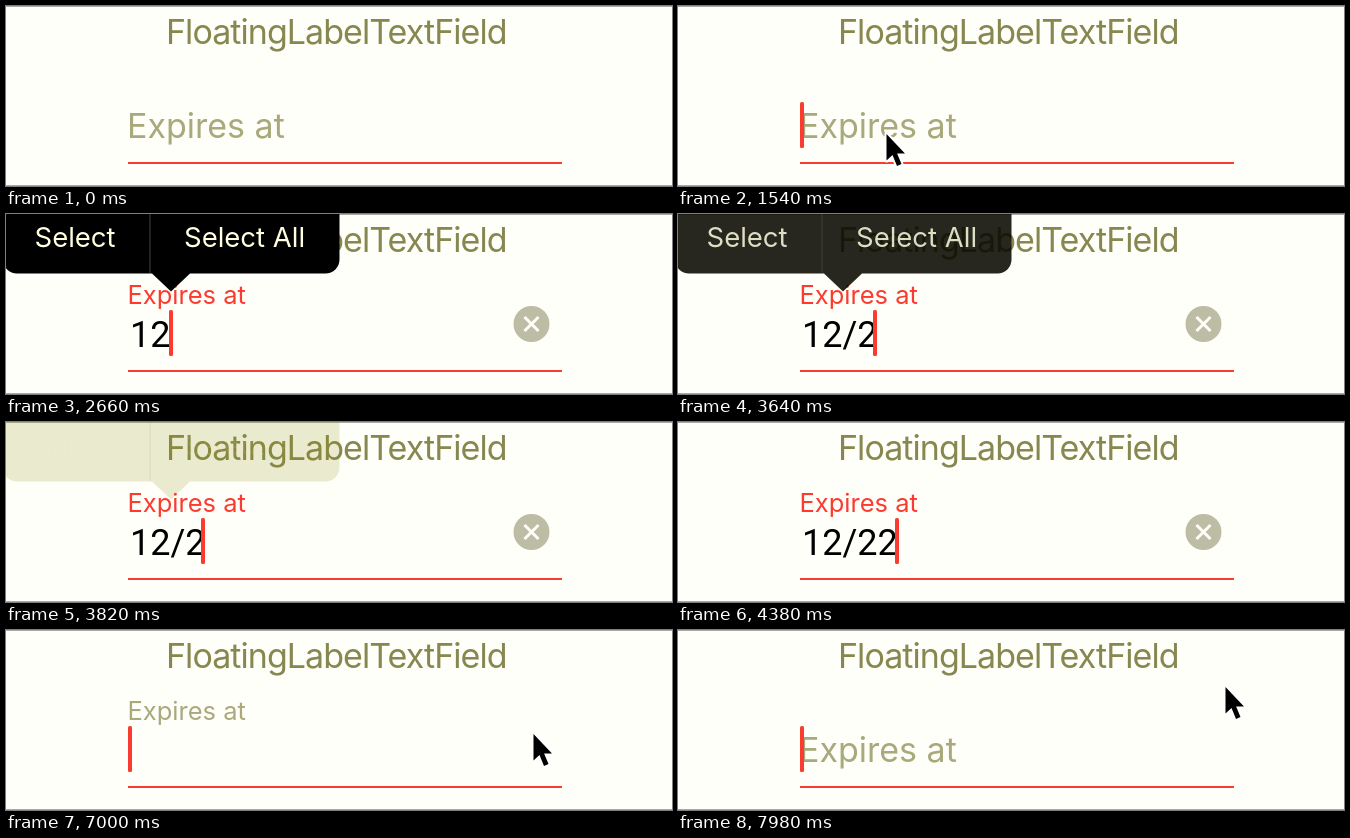
Recreate the animation shown at these times as an HTML page with a canvas. Size 666 px wide and 180 px high, loop 8000 ms.

```html
<!DOCTYPE html>
<html lang="en">
<head>
<meta charset="utf-8">
<title>Floating label text field</title>
<style>
  html, body { margin: 0; width: 100%; height: 100%; overflow: hidden; background: #fffffa; }
  canvas { display: block; }
</style>
</head>
<body>
<canvas id="stage" width="666" height="180"></canvas>
<script>
const ctx = document.getElementById('stage').getContext('2d');
const LOOP = 8000;
const TEXT_FONT = 'Inter, sans-serif';
const DIGIT_FONT = 'Roboto, sans-serif'; // digits of equal width
const PAPER = '#fffffa', RED = '#fb3b2f', GRAY = '#a9a97c', OLIVE = '#87874f';

const FOCUS = 1520, FLOAT_UP = 1880, CLEAR = 6960, FLOAT_DOWN = 7010;

// Field states: start time, text and caret position.
const STATES = [
  { at: 0, text: '' },
  { at: FOCUS, text: '', caret: 124 },
  { at: FLOAT_UP, text: '1', caret: 144 },
  { at: 2050, text: '12', caret: 165 },
  { at: 3500, text: '12/2', caret: 197 },
  { at: 4080, text: '12/22', caret: 219 },
  { at: CLEAR, text: '', caret: 124 }
];

// Each pointer visit is a list of [time, x, y].
const VISITS = [
  [[740, 600, 185], [1080, 400, 150], [1460, 208.5, 128], [2400, 208.5, 128]],
  [[4900, 208.5, 128], [5640, 568, 122], [5800, 575, 118], [6400, 527.5, 104],
   [7440, 527.5, 104], [7760, 550, 61], [7920, 547.5, 57], [8000, 547.5, 57]]
];

const clamp = v => Math.min(1, Math.max(0, v));
const progress = (t, from, to) => clamp((t - from) / (to - from));
const smooth = p => p * p * (3 - 2 * p);
const mix = (a, b, p) => a + (b - a) * p;

function write(text, x, y, size, color, { font = TEXT_FONT, spacing = 0 } = {}) {
  ctx.font = `${size}px ${font}`;
  ctx.letterSpacing = spacing + 'px';
  ctx.fillStyle = color;
  ctx.fillText(text, x, y);
}

function rect(x, y, w, h, color) {
  ctx.fillStyle = color;
  ctx.fillRect(x, y, w, h);
}

function drawLabel(t, hasText) {
  const up = smooth(progress(t, FLOAT_UP, 2180)) - smooth(progress(t, FLOAT_DOWN, 7310));
  write('Expires at', mix(121, 121.5, up), mix(132, 90, up), mix(34, 25.5, up), hasText ? RED : GRAY);
}

function drawClearButton() {
  ctx.fillStyle = '#bdbda6';
  ctx.beginPath();
  ctx.arc(525.5, 110, 18, 0, Math.PI * 2);
  ctx.fill();
  ctx.strokeStyle = PAPER;
  ctx.lineWidth = 3;
  ctx.beginPath();
  ctx.moveTo(518.5, 103); ctx.lineTo(532.5, 117);
  ctx.moveTo(532.5, 103); ctx.lineTo(518.5, 117);
  ctx.stroke();
}

function drawCaret(t, state) {
  const phase = (t - state.at) % 1000;
  ctx.globalAlpha = 1 - progress(phase, 680, 760) + progress(phase, 920, 1000);
  ctx.fillStyle = RED;
  ctx.beginPath();
  ctx.roundRect(state.caret - 2, 96, 4, 46, 1.5);
  ctx.fill();
  ctx.globalAlpha = 1;
}

function drawMenu(t) {
  const alpha = progress(t, 2110, 2320) - progress(t, 3605, 3840);
  if (alpha <= 0) return;
  const shape = new Path2D();
  shape.roundRect(-3, -20, 336.5, 79.5, 14);
  shape.addPath(new Path2D('M146 59.4H184L165 77.5Z'));

  // The half-faded menu has a yellow tint.
  ctx.fillStyle = `rgba(255,255,0,${1.4 * alpha * (1 - alpha)})`;
  ctx.fill(shape);
  ctx.globalAlpha = alpha;
  ctx.fillStyle = '#000';
  ctx.fill(shape);
  rect(143.5, 0, 1, 59, '#45453a');
  write('Select', 28.5, 32.5, 27.5, '#ffffe0');
  write('Select All', 178, 32.5, 27.5, '#ffffe0');
  ctx.globalAlpha = 1;
}

function drawPointer(t) {
  const path = VISITS.find(v => t >= v[0][0] && t < v[v.length - 1][0]);
  if (!path) return;
  const i = path.findIndex(point => point[0] > t);
  const [t0, x0, y0] = path[i - 1], [t1, x1, y1] = path[i];
  const p = smooth(progress(t, t0, t1));
  ctx.save();
  ctx.translate(mix(x0, x1, p), mix(y0, y1, p));
  const arrow = new Path2D('M0 0V26.5L6 21L10.5 32L15 30L10.6 19.5H18.5Z');
  ctx.strokeStyle = '#fff';
  ctx.lineWidth = 4;
  ctx.lineJoin = 'round';
  ctx.stroke(arrow);
  ctx.fillStyle = '#000';
  ctx.fill(arrow);
  ctx.restore();
}

function draw(t) {
  const state = STATES.findLast(s => s.at <= t);
  rect(0, 0, 666, 180, PAPER);
  rect(0, 0, 666, 1, '#aaaaa4');
  rect(0, 179, 666, 1, '#aaaaa4');
  write('FloatingLabelTextField', 160, 38, 34, OLIVE, { spacing: -0.95 });
  rect(122, 156, 434, 2, RED);
  drawLabel(t, state.text !== '');
  write(state.text, 124, 132.5, 36, '#000', { font: DIGIT_FONT });
  if (state.text) drawClearButton();
  if (state.caret) drawCaret(t, state);
  drawMenu(t);
  drawPointer(t);
}

const start = performance.now();
function frame() {
  draw((performance.now() - start) % LOOP);
  requestAnimationFrame(frame);
}
frame();
</script>
</body>
</html>
```
